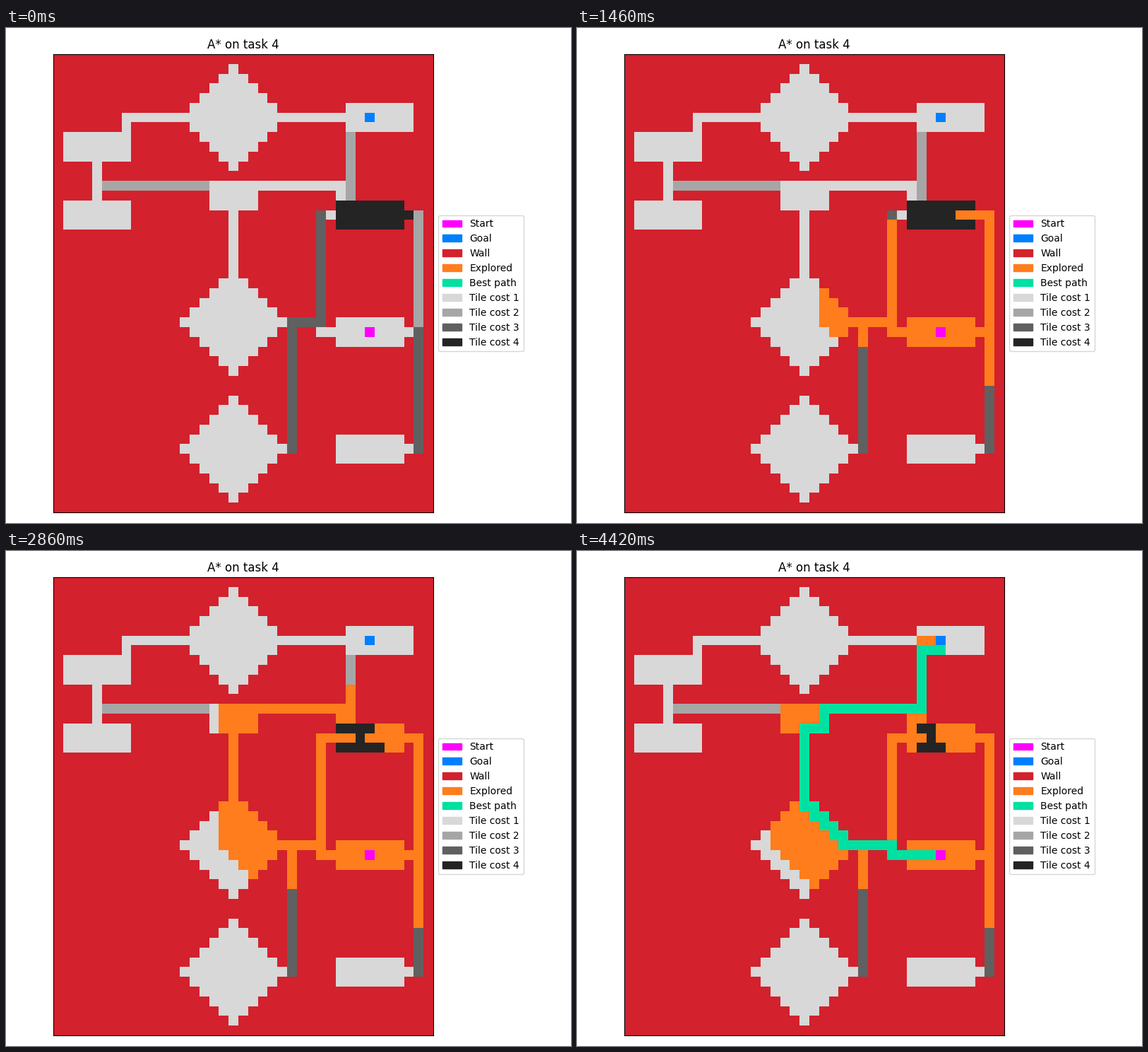
Animation of 800x700 px, one loop 5.42 s. Source, as a matplotlib script:

```python
from itertools import count

import matplotlib.pyplot as plt
import numpy as np
from matplotlib.animation import FuncAnimation
from matplotlib.colors import ListedColormap
from matplotlib.patches import Patch

W, H, DPI = 800, 700, 100
ROWS, COLS = 47, 39
STEP_MS, FRAMES = 20, 271
START, GOAL = (28, 32), (6, 32)

PALETTE = {
    "Start": "#ff00ff",
    "Goal": "#007fff",
    "Wall": "#d3212d",
    "Explored": "#ff7d1d",
    "Best path": "#00e0a0",
    "Tile cost 1": "#d8d8d8",
    "Tile cost 2": "#a6a6a6",
    "Tile cost 3": "#606060",
    "Tile cost 4": "#242424",
}
S, G, WALL, SEEN, PATH = range(5)


def build_map():
    grid = np.full((ROWS, COLS), WALL)

    def fill(r0, r1, c0, c1, cost=1):
        grid[r0:r1 + 1, c0:c1 + 1] = PATH + cost

    rr, cc = np.indices(grid.shape)
    for row in (6, 27, 40):
        grid[abs(rr - row) + abs(cc - 18) <= 5] = PATH + 1

    # rooms
    fill(8, 10, 1, 7)
    fill(15, 17, 1, 7)
    fill(13, 15, 16, 20)
    fill(5, 7, 30, 36)
    fill(15, 17, 29, 35, 4)
    fill(27, 29, 29, 35)
    fill(39, 41, 29, 35)

    # corridors
    fill(6, 6, 7, 30)
    fill(7, 7, 7, 7)
    fill(11, 14, 4, 4)
    fill(13, 13, 5, 15, 2)
    fill(13, 13, 21, 29)
    fill(14, 14, 29, 29)
    fill(8, 14, 30, 30, 2)
    fill(16, 22, 18, 18)
    fill(16, 16, 28, 28)
    fill(16, 16, 36, 36, 4)
    fill(16, 27, 37, 37, 2)
    fill(28, 40, 37, 37, 3)
    fill(16, 27, 27, 27, 3)
    fill(27, 27, 24, 26, 3)
    fill(28, 40, 24, 24, 3)
    fill(28, 28, 27, 28)
    fill(28, 28, 36, 36)
    fill(40, 40, 36, 36)
    return grid


def a_star(grid):
    """Return the expanded cells in order and the path from goal to start."""
    def h(cell):
        return abs(cell[0] - GOAL[0]) + abs(cell[1] - GOAL[1])

    order = count()
    queue = [(h(START), next(order), START)]
    g, parent, closed = {START: 0}, {}, []
    while queue:
        item = min(queue)
        queue.remove(item)
        cell = item[2]
        if cell == GOAL:
            break
        if cell in closed:
            continue
        closed.append(cell)
        for dr, dc in ((0, 1), (0, -1), (1, 0), (-1, 0)):
            nxt = cell[0] + dr, cell[1] + dc
            if grid[nxt] == WALL:
                continue
            cost = g[cell] + grid[nxt] - PATH
            if cost < g.get(nxt, np.inf):
                g[nxt], parent[nxt] = cost, cell
                queue.append((cost + h(nxt), next(order), nxt))

    path, cell = [], parent[GOAL]
    while cell != START:
        path.append(cell)
        cell = parent[cell]
    return closed[1:], path


base = build_map()
explored, best = a_star(base)
base[START], base[GOAL] = S, G
changes = [(c, SEEN) for c in explored] + [(c, PATH) for c in best]

fig = plt.figure(figsize=(W / DPI, H / DPI), dpi=DPI, facecolor="white")
ax = fig.add_axes([67 / W, 15 / H, 538 / W, 648 / H])
image = ax.imshow(base, cmap=ListedColormap(list(PALETTE.values())),
                  vmin=-0.5, vmax=len(PALETTE) - 0.5,
                  interpolation="nearest", aspect="auto")
ax.set_xticks([])
ax.set_yticks([])
ax.set_title("A* on task 4")
ax.legend(handles=[Patch(color=c, label=name) for name, c in PALETTE.items()],
          loc="center left", bbox_to_anchor=(1, 0.5))


def draw(n):
    grid = base.copy()
    for cell, code in changes[:max(0, n - 1)]:
        grid[cell] = code
    image.set_data(grid)
    return [image]


def reset():
    return draw(0)


anim = FuncAnimation(fig, draw, frames=FRAMES, init_func=reset,
                     interval=STEP_MS, repeat=True)
plt.show()
```
